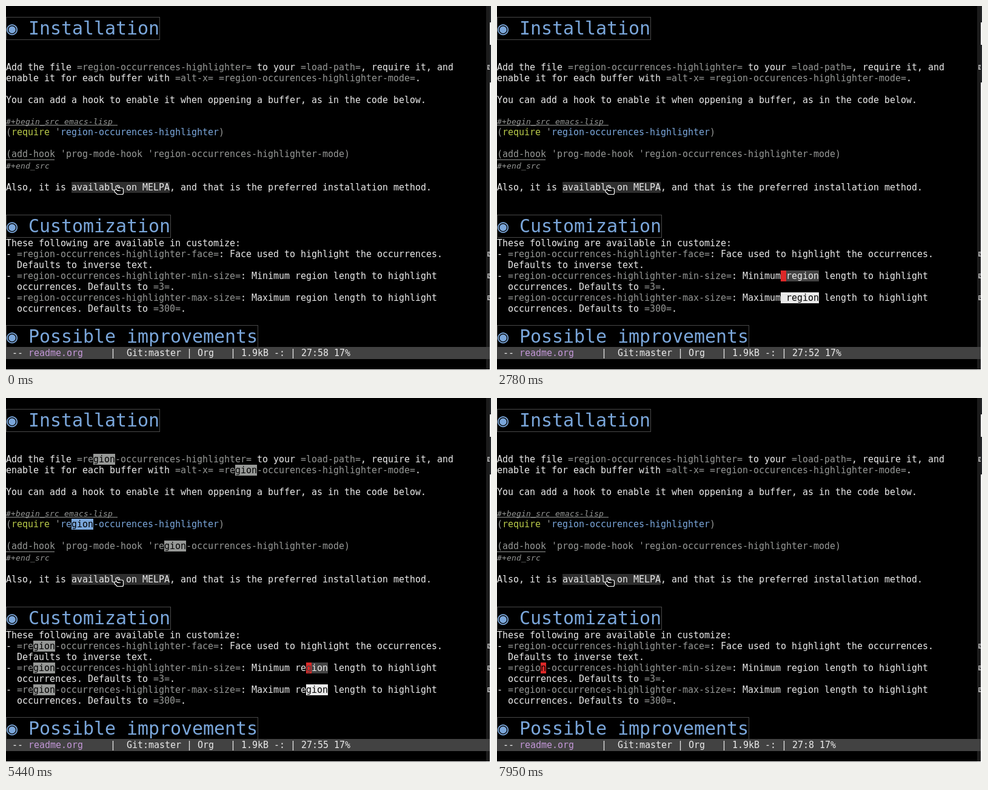
An HTML page for the animation above (7990 ms loop, 800 px wide and 600 px high).

```html
<!DOCTYPE html>
<html lang="en">
<head>
<meta charset="utf-8">
<title>Region highlighter</title>
<style>
  html, body { margin: 0; width: 100%; height: 100%; overflow: hidden; background: #000; }
  #stage {
    position: relative; width: 800px; height: 600px; overflow: hidden;
    background: #000; color: #eaeaea;
    font: 15px/18px "DejaVu Sans Mono", monospace;
    font-variant-ligatures: none;
  }
  /* Snap the advance to the whole-pixel terminal grid. */
  #stage div, #stage i { letter-spacing: calc(9px - 1ch); }
  #stage .head { font-size: 30px; line-height: 35px; letter-spacing: calc(18px - 1ch); }
  #stage .small { font-size: 13px; line-height: 15px; font-style: italic; letter-spacing: calc(8px - 1ch); }
  #stage div, #stage i, #stage svg { position: absolute; white-space: pre; }
  .frame { left: 0; height: 36px; border: 1px solid #484848; }
  .rule { left: 0; height: 1px; background: #969896; }
  .hover { left: 108px; top: 290px; width: 162px; height: 18px; background: #2e2e2e; }
  .mode { left: 0; top: 562px; width: 797px; height: 19px; padding: 1px 0 0 1px; background: #424242; }
  .mode b { font-weight: normal; color: #c397d8; }
  .echo { left: 0; top: 582px; }
  .fringe { left: 792px; top: 0; width: 6px; height: 600px; background: #1c1c1c; }
  .bar { left: 798px; width: 2px; }
  .edge { left: 0; top: 599px; width: 800px; height: 1px; background: #fff; }
</style>
</head>
<body>
<div id="stage">
  <div class="hover"></div>
  <div id="text"></div>
  <div id="marks"></div>
  <svg style="left:176px;top:293px" width="20" height="20" fill="#000" stroke="#fff" stroke-width="1.2" stroke-linejoin="round">
    <path d="M6 9.5L5 4.5Q6.5 2.5 8 4.5L9 7H15Q17.5 7 17.5 9.5V15.5Q17.5 17.5 15.5 17.5H7.5L3 13Q2 9.5 6 9.5L8.5 11.5H13"/>
  </svg>
  <div class="fringe"></div>
  <div class="bar" style="top:0;height:600px;background:#26282c"></div>
  <div class="bar" style="top:27px;height:37px;background:#fff"></div>
  <div class="bar" style="top:126px;height:474px;background:#fff"></div>
  <div class="edge"></div>
  <div class="mode"> -- <b>readme.org</b>     |  Git:master | Org   | 1.9kB -: | <span id="pos"></span> 17%</div>
  <div class="echo" id="echo">Mark set</div>
</div>
<script>
const LOOP = 7990, CELL = 9, MARK = 59;
const WHITE = '#eaeaea', GREY = '#969896', BLUE = '#7aa6da', GREEN = '#b9ca4a';
const RED = '#dc2828', REGION = '#424242';
const $ = id => document.getElementById(id);

// Plain prose: =verbatim= parts turn grey.
const prose = s => s.split(/(=[^=\s]+=)/).map((p, i) => [i % 2 ? GREY : WHITE, p]);
const line = (top, parts) => ({ top, parts, cell: CELL, x: 0, height: 18, cls: '' });
const text = (top, s) => line(top, prose(s));
const heading = (top, s) =>
  ({ top: top + 1, parts: [[BLUE, '◉ ' + s]], cell: 18, x: 1, height: 36, cls: 'head' });
const fence = (top, s) =>
  ({ top, parts: [[GREY, s]], cell: 8, x: 0, height: 15, cls: 'small' });

const point = text(436, '- =region-occurrences-highlighter-min-size=: Minimum region length to highlight');
const rows = [
  heading(18, 'Installation'),
  text(92, 'Add the file =region-occurrences-highlighter= to your =load-path=, require it, and'),
  text(110, 'enable it for each buffer with =alt-x= =region-occurences-highlighter-mode=.'),
  text(146, 'You can add a hook to enable it when oppening a buffer, as in the code below.'),
  fence(183, '#+begin_src emacs-lisp'),
  line(199, [[GREY, '('], [GREEN, 'require'], [GREY, " '"], [BLUE, 'region-occurences-highlighter'], [GREY, ')']]),
  line(235, [[GREY, "(add-hook 'prog-mode-hook 'region-occurrences-highlighter-mode)"]]),
  fence(256, '#+end_src'),
  text(290, 'Also, it is available on MELPA, and that is the preferred installation method.'),
  heading(344, 'Customization'),
  text(382, 'These following are available in customize:'),
  text(400, '- =region-occurrences-highlighter-face=: Face used to highlight the occurrences.'),
  text(418, '  Defaults to inverse text.'),
  point,
  text(454, '  occurrences. Defaults to =3=.'),
  text(472, '- =region-occurrences-highlighter-max-size=: Maximum region length to highlight'),
  text(490, '  occurrences. Defaults to =300=.'),
  heading(526, 'Possible improvements')
];

function add(parent, tag, cls, css, content = '') {
  const el = document.createElement(tag);
  el.className = cls;
  el.style.cssText = css;
  el.textContent = content;
  parent.append(el);
  return el;
}

for (const row of rows) {
  row.text = row.parts.map(p => p[1]).join('');
  row.colors = row.parts.flatMap(([c, s]) => Array(s.length).fill(c));
  const el = add($('text'), 'div', row.cls, `left:${row.x}px;top:${row.top}px`);
  for (const [color, s] of row.parts) add(el, 'span', '', `color:${color}`, s);
  if (row.cls === 'head')
    add($('text'), 'div', 'frame', `top:${row.top - 1}px;width:${row.text.length * 18}px`);
}
add($('text'), 'div', 'rule', 'top:196px;width:184px');
add($('text'), 'div', 'rule', 'top:253px;width:80px');

// Wrapped-line arrows in the fringe.
for (const y of [92, 400, 436, 472]) {
  const arrow = add($('stage'), 'div', '', `left:794px;top:${y + 5}px;width:4px;height:8px;background:#a8a8a8`);
  add(arrow, 'div', '', 'left:1px;top:2px;width:3px;height:1px;background:#222');
  add(arrow, 'div', '', 'left:2px;top:4px;width:2px;height:2px;background:#222');
}

// Cursor path as [time, column].
const path = [[0, 58], [490, 59]];
function run(t0, c0, t1, c1, n) {
  for (let i = 0; i < n; i++) {
    const k = i / (n - 1);
    path.push([t0 + (t1 - t0) * k, Math.round(c0 + (c1 - c0) * k)]);
  }
}
run(1640, 58, 2450, 54, 5);
run(2640, 53, 2780, 52, 2);
run(2960, 51, 3590, 47, 5);
run(3750, 46, 3910, 45, 2);
run(4450, 46, 5440, 55, 9);
run(5570, 56, 5880, 58, 3);
path.push([6210, 57], [6690, 56]);
run(6910, 55, 7710, 18, 21);
run(7750, 16, 7950, 8, 6);

function paint(row, from, to, bg, fg) {
  const css = `left:${row.x + from * row.cell}px;top:${row.top}px;width:${(to - from) * row.cell}px;` +
    `height:${row.height}px;background:${bg};color:${fg};font-style:normal`;
  add($('marks'), 'i', row.cls, css, row.text.slice(from, to));
}

function markMatches(word, col) {
  for (const row of rows) {
    for (let i = row.text.indexOf(word); i >= 0; i = row.text.indexOf(word, i + 1)) {
      if (row !== point || i !== col) paint(row, i, i + word.length, row.colors[i], '#000');
    }
  }
}

let shown = '';
function draw(now) {
  const t = now % LOOP;
  const col = path.findLast(p => p[0] <= t + 0.01)[1];
  const lit = t >= 230 && (t < 1020 || t >= 1490);
  const active = t >= 1600 && t < 6210;
  const echo = t >= 1600 && t < 1840;
  const key = [col, lit, active, echo].join();
  if (key !== shown) {
    shown = key;
    $('marks').replaceChildren();
    $('pos').textContent = '27:' + col;
    $('echo').style.visibility = echo ? 'visible' : 'hidden';
    const selected = active && col < MARK;
    if (selected) {
      const word = point.text.slice(col, MARK);
      if (word.length >= 3) markMatches(word, col);
      paint(point, col, MARK, REGION, WHITE);
    }
    if (lit) paint(point, col, col + 1, RED, selected ? REGION : '#000');
  }
  requestAnimationFrame(draw);
}
requestAnimationFrame(draw);
</script>
</body>
</html>
```
